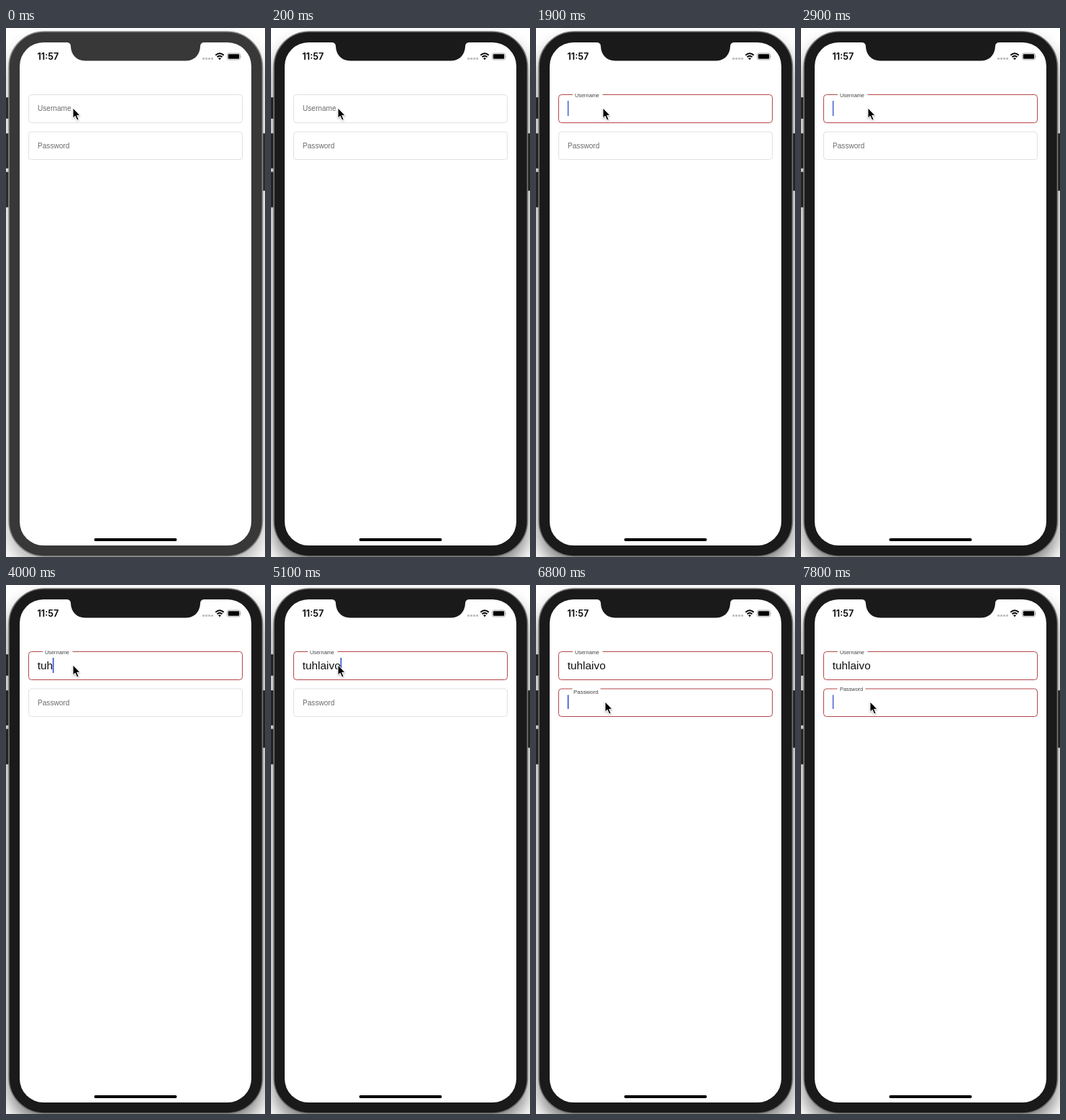
An HTML page that plays this animation: 360 by 734 pixels, repeating every 8 s.

```html
<!DOCTYPE html>
<html lang="en">
<head>
<meta charset="utf-8">
<title>Login form</title>
<style>
  html, body { margin: 0; width: 100%; height: 100%; overflow: hidden; background: #fff; }
  svg { display: block; width: 360px; height: 734px; }
  text { font-family: "Liberation Sans", Arial, sans-serif; white-space: pre; }
  .clock { font: 600 12.7px Inter, sans-serif; }
  .body { fill: #1a1a1a; stroke: #777; stroke-width: 1.6; }
  .edge { fill: #1a1a1a; }
  .button { fill: #222; stroke: #3a3a3a; stroke-width: .8; }
  .shadow { opacity: .5; }
  .idle .body { fill: #383838; stroke: #8a8a8a; }
  .idle .edge { fill: #383838; }
  .idle .button { fill: #2b2b2b; stroke: #484848; }
  .idle .shadow { opacity: .3; }
  .box { fill: none; stroke: #e0e0e0; }
  .active .box { stroke: #b5474b; }
  .gap { fill: #fff; visibility: hidden; }
  .active .gap { visibility: visible; }
  .label { font-size: 10.1px; }
  .value { font-size: 15.4px; fill: #111; }
  .caret { fill: #3c55d0; }
</style>
</head>
<body>
<svg id="stage" viewBox="0 0 360 734">
  <defs>
    <filter id="soft" x="-20%" y="-20%" width="140%" height="140%">
      <feGaussianBlur stdDeviation="12"/>
    </filter>
    <filter id="lift" x="-50%" y="-50%" width="200%" height="200%">
      <feDropShadow dx="0" dy="1" stdDeviation="1" flood-opacity=".35"/>
    </filter>
  </defs>

  <rect class="shadow" x="4" y="20" width="352" height="728" rx="50" filter="url(#soft)"/>
  <g class="button">
    <rect x="-3" y="96.5" width="8" height="29" rx="1"/>
    <rect x="-3" y="146.5" width="8" height="48" rx="1"/>
    <rect x="-3" y="200" width="8" height="48.5" rx="1"/>
    <rect x="355" y="146.5" width="8" height="79" rx="1"/>
  </g>
  <rect class="body" x="4" y="5" width="352.5" height="728" rx="49"/>
  <rect x="19" y="20" width="322" height="698" rx="33" fill="#fff"/>
  <path class="edge" d="M84 19V20Q90 20 90 25.5C90.500 37 98 45.500 110 45.500H250C262 45.500 269.500 37 270 25.500Q270 20 276 20V19Z"/>

  <text class="clock" x="43.500" y="44">11:57</text>
  <path d="M273 42.500h15" stroke="#bbb" stroke-width="2.600" stroke-dasharray="3 1"/>
  <g fill="none" stroke="#000" stroke-width="2">
    <path d="M291.300 37.800Q297 32.600 302.700 37.800M293.500 40.300Q297 37.200 300.500 40.300"/>
  </g>
  <path d="M295 42Q297 40.300 299 42L297 44.200Z"/>
  <rect x="307.500" y="35" width="18" height="9" rx="2.300" fill="#fff" stroke="#999" stroke-width=".8"/>
  <rect x="308.800" y="36.300" width="15.400" height="6.400" rx="1.200"/>
  <path d="M326.600 38q1.200 1.500 0 3z" fill="#888"/>
  <rect x="122.500" y="708" width="115" height="4" rx="2"/>

  <g id="fields"></g>

  <g id="pointer" filter="url(#lift)">
    <path d="M0 0V14.200L3.200 11.200L5.700 17L8.200 15.900L5.700 10.300H10Z" stroke="#fff" stroke-width="1" stroke-linejoin="round"/>
  </g>
</svg>
<script>
const LOOP = 8000, STEP = 100;
const stage = document.getElementById('stage');
const pointer = document.getElementById('pointer');
const start = performance.now();

const NAME = 'tuhlaivo';
const KEYS = [3600, 3800, 4000, 4400, 4600, 4800, 5000, 5100];

// Each row is [time, value, ...].
const userCaret = [
  [499, 0], [500, 1], [850, 1], [1200, 0], [1400, 0], [1700, 1],
  [1850, 1], [2200, 0], [2400, 0], [2700, 1], [2850, 1], [3200, 0],
  [3400, 0], [3600, 1], [5600, 1], [5900, 0], [6050, 0], [6300, 1],
  [6599, 1], [6600, 0]
];
const passCaret = [
  [6599, 0], [6600, 1], [7100, 1], [7300, 0], [7600, 0], [7800, .85]
];
const pointerPath = [
  [5600, 93, 111], [5800, 88, 128], [6000, 91, 158], [6150, 96, 168], [6300, 96, 162]
];

const mix = (a, b, p) => a + (b - a) * p;
const clamp = p => Math.min(1, Math.max(0, p));
const ease = p => p * p * (3 - 2 * p);

function track(rows, t) {
  const i = rows.findIndex(row => row[0] > t);
  if (i === 0) return rows[0].slice(1);
  if (i < 0) return rows[rows.length - 1].slice(1);
  const a = rows[i - 1], b = rows[i];
  const p = (t - a[0]) / (b[0] - a[0]);
  return a.slice(1).map((v, k) => mix(v, b[k + 1], p));
}

function makeField({ name, y, height, gap, focus, caretY, caretHeight, caret }) {
  const g = document.createElementNS('http://www.w3.org/2000/svg', 'g');
  g.innerHTML = `
    <rect class="box" x="31.5" y="${y}" width="297" height="${height}" rx="4"/>
    <rect class="gap" x="${gap[0]}" y="${y - 1.5}" width="${gap[1] - gap[0]}" height="3"/>
    <text class="label">${name}</text>
    <text class="value" x="43.7" y="${y + 24.5}"></text>
    <rect class="caret" y="${caretY}" width="1.7" height="${caretHeight}"/>`;
  document.getElementById('fields').append(g);
  const [label, value, bar] = ['.label', '.value', '.caret'].map(s => g.querySelector(s));

  return (t, typed) => {
    const p = ease(clamp((t - focus + 50) / 350));
    g.classList.toggle('active', t >= focus);
    label.setAttribute('transform',
      `translate(${mix(44, 54, p)} ${mix(y + 22.8, y + 3, p)}) scale(${mix(1, .73, p)})`);
    label.setAttribute('fill', p > .5 ? '#444' : '#6c6c6c');
    value.textContent = typed;
    const width = typed ? value.getComputedTextLength() - .4 : 0;
    bar.setAttribute('x', 43.8 + width);
    bar.setAttribute('opacity', track(caret, t)[0]);
  };
}

const drawUser = makeField({
  name: 'Username', y: 92.5, height: 39, gap: [51, 92.5], focus: 500,
  caretY: 101, caretHeight: 21, caret: userCaret
});
const drawPass = makeField({
  name: 'Password', y: 144, height: 38.5, gap: [50.5, 89.5], focus: 6600,
  caretY: 152.5, caretHeight: 19.5, caret: passCaret
});

function draw(now) {
  const t = Math.floor(Math.max(0, now - start) % LOOP / STEP) * STEP;
  stage.classList.toggle('idle', t < 200);
  drawUser(t, NAME.slice(0, KEYS.filter(k => k <= t).length));
  drawPass(t, '');
  pointer.setAttribute('transform', `translate(${track(pointerPath, t).join(' ')})`);
  requestAnimationFrame(draw);
}
draw(start);
</script>
</body>
</html>
```
